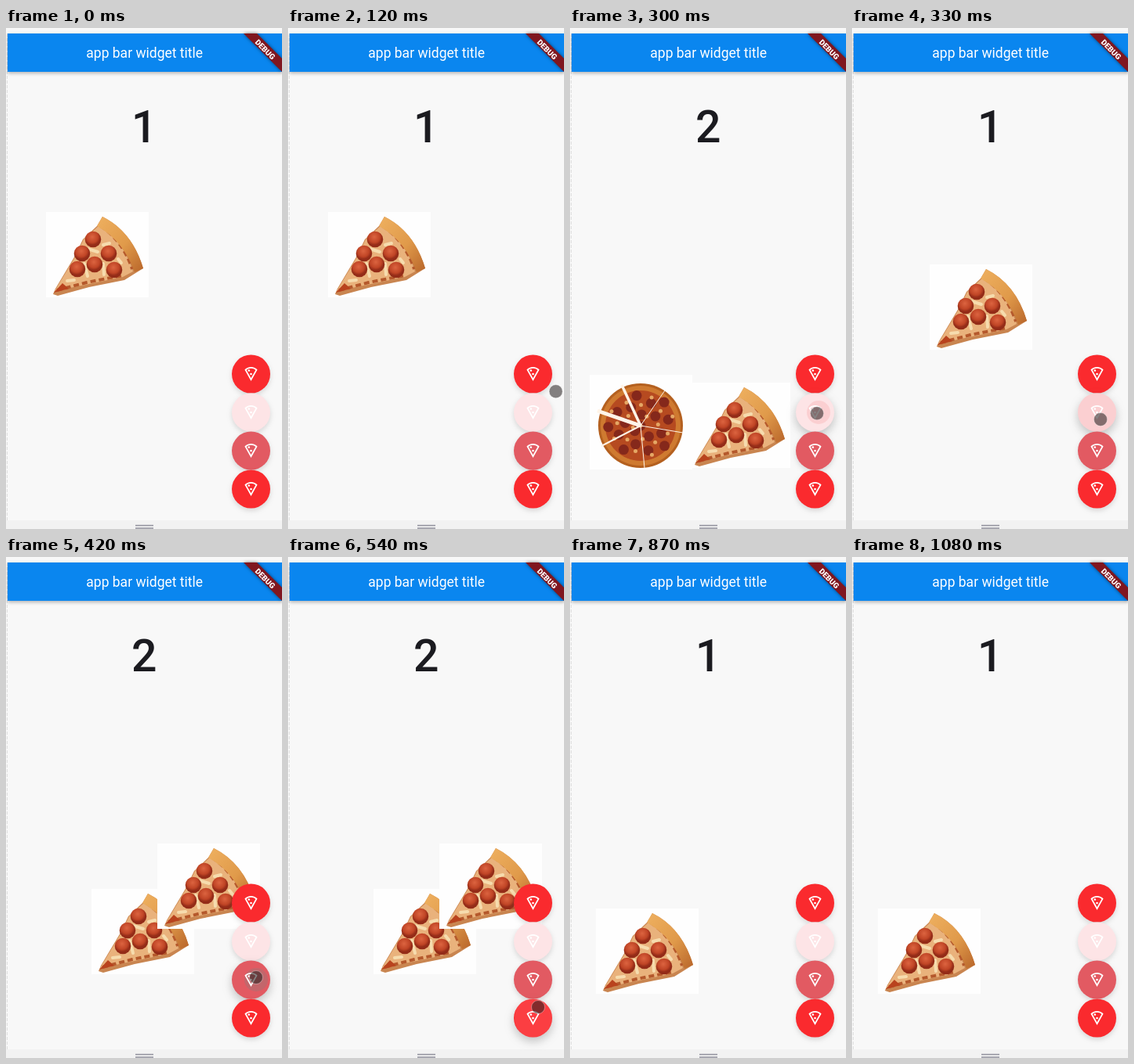
Animation, 352 px wide and 640 px high, one loop 1.11 s. Source, as an HTML page:

```html
<!DOCTYPE html>
<html lang="en">
<head>
<meta charset="utf-8">
<title>Pizza counter</title>
<style>
html, body { margin: 0; width: 100%; height: 100%; overflow: hidden; background: #f8f8f8 }
svg { display: block; width: 352px; height: 640px; font-family: Roboto, sans-serif; text-anchor: middle }
.button { filter: drop-shadow(0 3px 3px #5553) }
.button.pressed { filter: drop-shadow(0 5px 6px #5555) }
</style>
</head>
<body>
<svg viewBox="0 0 352 640">
  <defs>
    <linearGradient id="crust" x2="1" y2="1">
      <stop stop-color="#eeb060"/><stop offset=".55" stop-color="#e09a4a"/><stop offset="1" stop-color="#b8652a"/>
    </linearGradient>
    <radialGradient id="meat" cx=".45" cy=".35">
      <stop stop-color="#dc6440"/><stop offset=".7" stop-color="#c04526"/><stop offset="1" stop-color="#942c18"/>
    </radialGradient>
    <clipPath id="round"><circle r="24.5"/></clipPath>
    <path id="icon" fill="#fff" fill-rule="evenodd" transform="scale(.9) translate(-12 -12)" d="M12 2C8.43 2 5.23 3.54 3 6l9 16 9-16C18.78 3.55 15.57 2 12 2zM12 17.92 5.51 6.36C7.32 4.85 9.62 4 12 4s4.68.85 6.49 2.36zM9 5.5a1.5 1.5 0 1 0 .01 0zM12 10.5a1.5 1.5 0 1 0 .01 0z"/>
    <g id="slice">
      <path fill="#fefefe" d="M0 0h131v109H0z"/>
      <path fill="#c98550" d="M9 105 12 98 37 56 47 35 65 18 72 6Q110 25 124 72L100 87 55 96 15 107z"/>
      <path fill="#e9b27c" d="M11 101 38 56 48 35 68 17Q98 36 111 76L98 83 55 92z"/>
      <path fill="none" stroke="#b5592c" stroke-width="4" stroke-dasharray="7 4" d="M70 18Q98 37 110 73M14 100 52 90 98 81"/>
      <path fill="url(#crust)" d="M65 18 72 6Q110 25 124 72L113 77Q99 37 65 18z"/>
      <path fill="none" stroke="#f6dcae" stroke-width="4" stroke-linecap="round" d="M53 47 66 51M49 66l4 16M73 66l1 14M73 42l8-2M92 60l4 5M27 88l9-1"/>
      <path fill="#b9431e" d="m10 103 11-12 8 7z"/>
    </g>
    <g id="pie">
      <path fill="#fefefe" d="M0 0h131v121H0z"/>
      <circle cx="65" cy="65" r="54" fill="#b4601f"/>
      <circle cx="65" cy="65" r="51" fill="#cf7a30"/>
      <circle cx="65" cy="65" r="45" fill="#b64a20"/>
    </g>
  </defs>

  <rect width="352" height="640" fill="#f8f8f8"/>
  <rect y="629" width="352" height="11" fill="#f2f2f2"/>
  <path d="M1.5 7V629" stroke="#dedede" stroke-dasharray="4 2"/>
  <rect x="2" y="7" width="350" height="49" fill="#0a86ef" style="filter:drop-shadow(0 2px 2px #0004)"/>
  <text x="176.7" y="38" font-size="17.5" fill="#fff">app bar widget title</text>
  <path d="M303 7h17l32 32v17z" fill="#80161f" style="filter:drop-shadow(0 0 2px #0008)"/>
  <text transform="translate(330.5 27.5) rotate(45)" y="3.4" font-size="9.8" font-weight="900" fill="#fff">DEBUG</text>
  <text id="count" x="176.3" y="146" font-size="57" font-weight="500" fill="#1b1b20"></text>
  <g id="photos"></g>
  <g id="buttons"></g>
  <path d="M165 635.5h23M165 639h23" stroke="#90909c" stroke-width="1.5"/>
  <circle id="pointer" r="8.5" fill="#201c1c" fill-opacity=".55" stroke="#fff" stroke-opacity=".35"/>
</svg>
<script>
const $ = id => document.getElementById(id);
const LOOP = 1110, STEP = 30, CENTER = 312.5;

// Toppings
const topping = (x, y, r) => `<circle cx="${x}" cy="${y}" r="${r}" fill="url(#meat)"/>`;
$('slice').innerHTML += [[60, 35], [46, 53], [80, 53], [40, 73], [62, 67], [87, 74]]
  .map(([x, y]) => topping(x, y, 10.3)).join('');

let toppings = '';
for (let i = 0; i < 19; i++) {
  const a = i * 2.4, r = 10 * Math.sqrt(i);
  toppings += `<circle cx="${65 + r * Math.cos(a)}" cy="${65 + r * Math.sin(a)}" r="6.5" fill="#85281b"/>`;
  toppings += `<circle cx="${65 + r * Math.cos(a + .5)}" cy="${65 + r * Math.sin(a + .5)}" r="2.5" fill="#e5a765"/>`;
}
const cuts = [[10, 46, 5], [41, 13, 3.5], [15, 91, 2], [70, 119, 1], [119, 74, 1], [96, 20, 1]];
$('pie').innerHTML += toppings + cuts
  .map(([x, y, w]) => `<path d="M65 65 ${x} ${y}" stroke="#fff4e8" stroke-width="${w}"/>`).join('');

// Each scene: start time, then photos as [kind, x, y]
const scenes = [
  [0, ['slice', 51, 235]],
  [210, ['slice', 150, 453], ['pie', 25, 443]],
  [330, ['slice', 99, 302]],
  [420, ['slice', 109, 424], ['slice', 193, 366]],
  [570, ['slice', 33, 449]]
];
const photoGroups = scenes.map(([, ...photos]) => {
  const g = document.createElementNS('http://www.w3.org/2000/svg', 'g');
  g.innerHTML = photos.map(([kind, x, y]) => `<use href="#${kind}" x="${x}" y="${y}"/>`).join('');
  return $('photos').appendChild(g);
});

// Buttons: centre y, fill, ripple colour, press time
const buttons = [
  [442, '#fa2a2e', '#ffffff40', 180],
  [491, '#fde4e6', '#f0606028', 270],
  [540, '#e25a62', '#80808050', 390],
  [589, '#fa2a2e', '#ffffff18', 480]
];
$('buttons').innerHTML = buttons.map(([y, fill, ripple]) =>
  `<g class="button" transform="translate(${CENTER} ${y})"><circle r="24.5" fill="${fill}"/>
   <g clip-path="url(#round)"><circle class="ripple" fill="${ripple}"/></g><use href="#icon"/></g>`).join('');
const buttonNodes = [...document.querySelectorAll('.button')];

// Pointer path: time, x, y; it slows down at each stop
const path = [[60, 362, 472], [210, 304, 450], [330, 317, 500], [420, 319, 537],
  [540, 319, 575], [660, 339, 517], [750, 362, 490]];

function pointerAt(t) {
  const i = path.findIndex(p => p[0] >= t);
  if (i < 1) return [-20, -20];
  const [t0, x0, y0] = path[i - 1], [t1, x1, y1] = path[i];
  const u = (t - t0) / (t1 - t0), k = u * u * (3 - 2 * u);
  return [x0 + (x1 - x0) * k, y0 + (y1 - y0) * k];
}

function draw() {
  const t = Math.floor(performance.now() % LOOP / STEP) * STEP;
  const current = scenes.findLastIndex(s => s[0] <= t);
  photoGroups.forEach((g, i) => g.style.display = i === current ? '' : 'none');
  $('count').textContent = scenes[current].length - 1;
  $('pointer').setAttribute('transform', `translate(${pointerAt(t)})`);

  buttonNodes.forEach((node, i) => {
    const age = t - buttons[i][3], on = age >= 0 && age < 120;
    const ripple = node.querySelector('.ripple');
    node.classList.toggle('pressed', on);
    ripple.setAttribute('r', on ? Math.min(36, age / 2) : 0);
    ripple.setAttribute('cx', path[i + 1][1] - CENTER);
  });
  requestAnimationFrame(draw);
}
draw();
</script>
</body>
</html>
```
